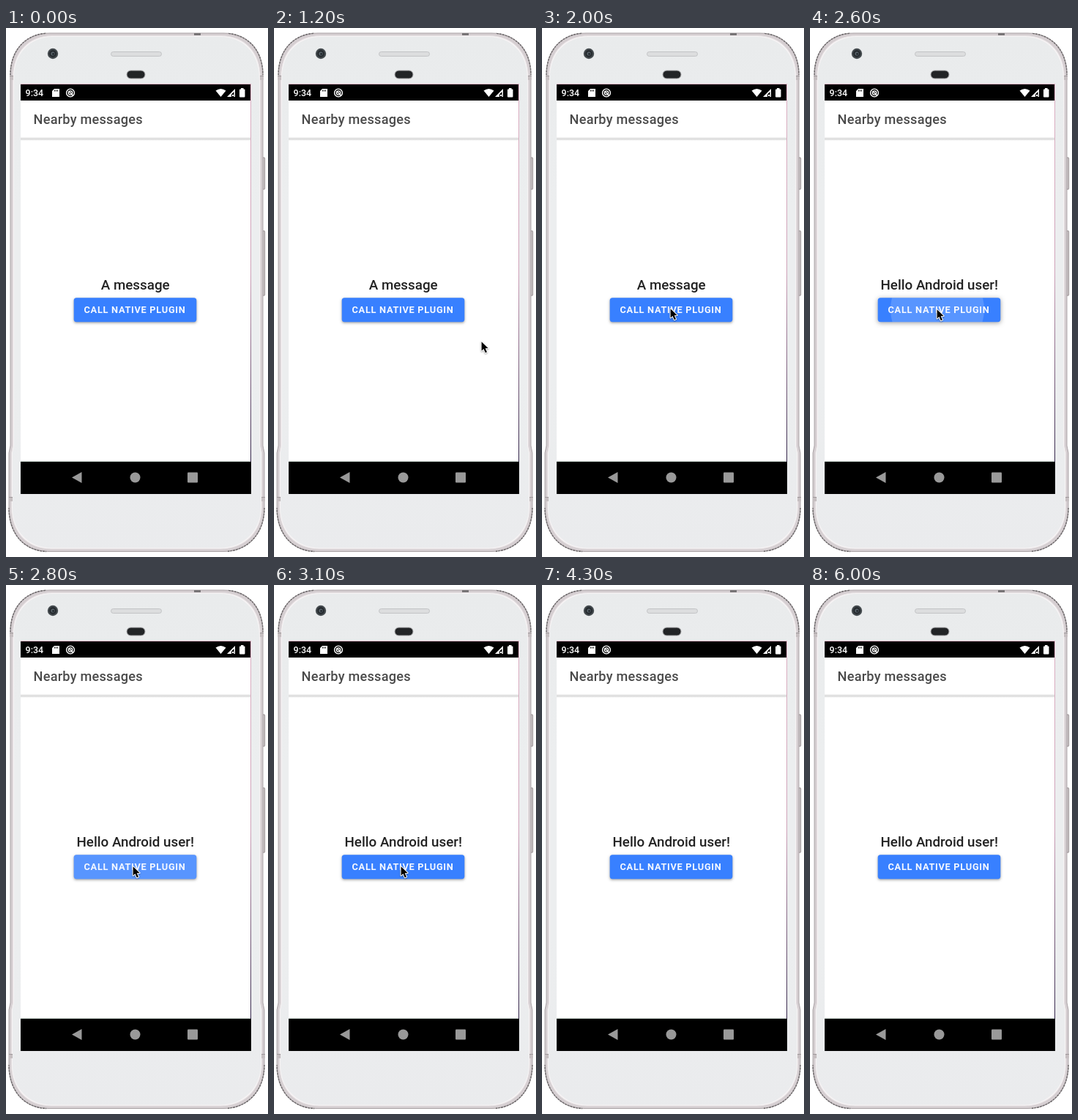
Write an HTML page with a canvas that moves like this. It is 358 px wide and 722 px high and loops after 6300 ms.

```html
<!DOCTYPE html>
<html lang="en">
<head>
<meta charset="utf-8">
<title>Nearby messages</title>
<style>
html, body { margin: 0; width: 100%; height: 100%; overflow: hidden; background: #fff; }
canvas { display: block; width: 358px; height: 722px; }
</style>
</head>
<body>
<canvas id="stage" width="358" height="722"></canvas>
<script>
const ctx = document.getElementById('stage').getContext('2d');
const LOOP = 6300, STEP = 100;
const FONT = 'Roboto, sans-serif';
const BUTTON = [92.7, 368.2, 167.6, 33, 3.6];

// Pointer tip: time, x, y
const POINTER_PATH = [
  [100, 320, 474], [500, 302, 450], [1000, 284, 429], [1200, 283, 427],
  [1500, 226, 405], [1800, 175, 384], [2000, 175, 382], [2500, 173, 383],
  [3800, 173, 383], [3900, 190, 387], [4000, 238, 400], [4100, 300, 418]
];
const TAP = 2500, REPLY = 2600, RIPPLE_FULL = 2800, RIPPLE_END = 3100;

const clamp = v => Math.max(0, Math.min(1, v));

function rect(x, y, w, h, color) {
  ctx.fillStyle = color;
  ctx.fillRect(x, y, w, h);
}

function round(x, y, w, h, r, fill, stroke) {
  ctx.beginPath();
  ctx.roundRect(x, y, w, h, r);
  paint(fill, stroke);
}

function disc(x, y, r, fill, stroke) {
  ctx.beginPath();
  ctx.arc(x, y, r, 0, Math.PI * 2);
  paint(fill, stroke);
}

function poly(points, fill, stroke) {
  ctx.beginPath();
  points.forEach(([x, y]) => ctx.lineTo(x, y));
  ctx.closePath();
  paint(fill, stroke);
}

function paint(fill, stroke) {
  if (fill) { ctx.fillStyle = fill; ctx.fill(); }
  if (stroke) { ctx.strokeStyle = stroke; ctx.stroke(); }
}

function fade(y0, y1, ...colors) {
  const gradient = ctx.createLinearGradient(0, y0, 0, y1);
  colors.forEach((c, i) => gradient.addColorStop(i / (colors.length - 1), c));
  return gradient;
}

function text(str, x, y, size, weight, color, align = 'left', spacing = 0) {
  ctx.font = `${weight} ${size}px ${FONT}`;
  ctx.textAlign = align;
  ctx.letterSpacing = `${spacing}px`;
  ctx.fillStyle = color;
  ctx.fillText(str, x, y);
  ctx.letterSpacing = '0px';
}

function bodyPath(inset) {
  const l = 6 + inset, r = 351 - inset, t = 7 + inset, b = 714.5 - inset;
  ctx.beginPath();
  ctx.moveTo(l + 54, t);
  ctx.lineTo(r - 54, t);
  ctx.bezierCurveTo(r - 22, t, r, t + 22, r, t + 57);
  ctx.lineTo(r, 570);
  ctx.lineTo(r + 2, 580);
  ctx.lineTo(r + 2, 655);
  ctx.bezierCurveTo(r + 2, b - 25, r - 20, b, r - 54, b);
  ctx.lineTo(l + 52, b);
  ctx.bezierCurveTo(l + 18, b, l - 2, b - 25, l - 2, 655);
  ctx.lineTo(l - 2, 580);
  ctx.lineTo(l, 570);
  ctx.lineTo(l, t + 57);
  ctx.bezierCurveTo(l, t + 22, l + 22, t, l + 54, t);
  ctx.closePath();
}

function drawPhone() {
  // Side keys
  round(350, 177, 3.5, 43, 1, '#cbc4c6', '#aaa3a5');
  round(350, 277, 3.5, 88, 1, '#cbc4c6', '#aaa3a5');

  bodyPath(0);
  ctx.lineWidth = 1;
  paint('#d5ced1', '#aaa3a6');

  // Darker rim around the four corners
  ctx.save();
  ctx.beginPath();
  [[0, 0], [303, 0], [0, 655], [303, 655]].forEach(([x, y]) => ctx.rect(x, y, 55, 64));
  ctx.clip();
  bodyPath(0);
  ctx.lineWidth = 1.5;
  ctx.setLineDash([3, 1]);
  paint(null, '#6f6b6d');
  ctx.restore();

  bodyPath(3.5);
  paint('#f6f3f4', '#e4dfe1');
  bodyPath(5);
  paint(fade(10, 712, '#e9ebec', '#eceeef', '#eceeef', '#eaebed'));

  // Antenna breaks
  [[5, 65], [347, 65], [4, 640], [349, 640]].forEach(([x, y]) => {
    rect(x, y, 5, 6, '#c6bfc1');
    rect(x, y, 5, 1, '#9e989a');
  });
  rect(257, 7, 9, 3, '#777476');

  disc(64, 35, 7.2, '#444a4e');
  disc(64, 35, 5, '#262b2f');
  disc(64, 35, 2.6, '#59636a');
  disc(64.5, 35.5, 1.4, '#20262b');
  round(143.5, 32.5, 69, 6, 3, '#dcddde', '#c3c4c6');
  round(165, 58, 25, 11, 5.5, '#222426', '#aaaaac');
}

function drawStatusIcons() {
  poly([[66, 83], [73, 83], [73, 94], [63, 94], [63, 86]], '#fff');
  [66, 68, 70].forEach(x => rect(x, 84.5, 1, 2, '#000'));

  ctx.lineWidth = 1.4;
  disc(88, 88.5, 5.4, null, '#fff');
  disc(88, 88.5, 2.6, null, '#fff');
  ctx.beginPath();
  ctx.moveTo(86, 86.5);
  ctx.lineTo(91.5, 92);
  paint(null, '#fff');

  ctx.beginPath();
  ctx.moveTo(293.5, 94);
  ctx.lineTo(286.5, 85.5);
  ctx.quadraticCurveTo(293.5, 80.5, 300.5, 85.5);
  ctx.closePath();
  paint('#fff');

  poly([[302, 94], [313, 83], [313, 94]], '#fff');
  poly([[308, 94], [308, 90.5], [311.5, 87], [311.5, 94]], '#000');
  rect(309, 91, 2, 2, '#fff');
  round(319, 83.5, 7.5, 11, 1, '#fff');
  rect(321, 82, 3.5, 2, '#fff');
}

function drawScreen() {
  rect(20, 76, 315, 560, '#fff');
  rect(20, 76, 315, 1, '#d9b3c2');
  rect(20, 77, 314, 22, '#000');
  text('9:34', 26.6, 93, 12.4, 500, '#fff');
  drawStatusIcons();

  text('Nearby messages', 37.6, 130.5, 18.15, 500, '#4a4a4a', 'left', 0.23);
  rect(20, 149, 314, 5, fade(149, 154, 'rgba(0,0,0,.03)', 'rgba(0,0,0,.15)', 'rgba(0,0,0,0)'));

  rect(334, 76, 1, 516, fade(76, 592, '#dcb0c2', '#cfa2b9', '#33264a'));
  rect(20, 591, 314, 1, '#cbd6d0');
  rect(20, 592, 315, 44, '#000');
  poly([[90, 613.5], [103.5, 606], [103.5, 621]], '#999');
  disc(176.5, 613.5, 7, '#999');
  round(248, 606.5, 14, 14, 1, '#999');
}

function drawButton(t) {
  ctx.save();
  ctx.shadowColor = 'rgba(0,0,0,.38)';
  ctx.shadowBlur = t >= TAP && t < RIPPLE_FULL ? 6 : 3.5;
  ctx.shadowOffsetY = 1.3;
  round(...BUTTON, '#3880ff');
  ctx.restore();

  if (t >= TAP && t < RIPPLE_END) {
    const grow = clamp((t - TAP + STEP) / (RIPPLE_FULL - TAP));
    const alpha = 0.16 * (1 - clamp((t - RIPPLE_FULL) / (RIPPLE_END - RIPPLE_FULL)));
    ctx.save();
    ctx.beginPath();
    ctx.roundRect(...BUTTON);
    ctx.clip();
    disc(174, 384, 96 * grow, `rgba(255,255,255,${alpha})`);
    ctx.restore();
  }
  text('CALL NATIVE PLUGIN', 106.5, 388.9, 12.8, 600, '#f5f8ff', 'left', 0.7);
}

function pointerAt(t) {
  const first = POINTER_PATH[0], last = POINTER_PATH[POINTER_PATH.length - 1];
  if (t < first[0] || t > last[0]) return null;
  const i = Math.max(1, POINTER_PATH.findIndex(key => key[0] >= t));
  const [t0, x0, y0] = POINTER_PATH[i - 1], [t1, x1, y1] = POINTER_PATH[i];
  const k = (t - t0) / (t1 - t0);
  return [x0 + (x1 - x0) * k, y0 + (y1 - y0) * k];
}

function drawPointer(t) {
  const tip = pointerAt(t);
  if (!tip) return;
  const arrow = [[0, 0.8], [0, 13], [2.9, 10.5], [5.2, 15.8], [7.4, 14.8], [5.1, 9.7], [9, 9.5]];
  ctx.save();
  ctx.translate(tip[0] + 0.6, tip[1] + 0.5);
  ctx.lineWidth = 2;
  ctx.lineJoin = 'round';
  ctx.shadowColor = 'rgba(0,0,0,.35)';
  ctx.shadowBlur = 2;
  ctx.shadowOffsetY = 1;
  poly(arrow, null, '#fff');
  ctx.shadowColor = 'transparent';
  poly(arrow, '#000');
  ctx.restore();
}

function draw(now) {
  const t = Math.floor((now % LOOP) / STEP) * STEP;
  rect(0, 0, 358, 722, '#fff');
  drawPhone();
  drawScreen();
  text(t < REPLY ? 'A message' : 'Hello Android user!', 176.7, 357, 18.8, 500, '#222', 'center');
  drawButton(t);
  drawPointer(t);
}

const start = performance.now();
function tick() {
  draw(performance.now() - start);
  requestAnimationFrame(tick);
}
tick();
</script>
</body>
</html>
```
